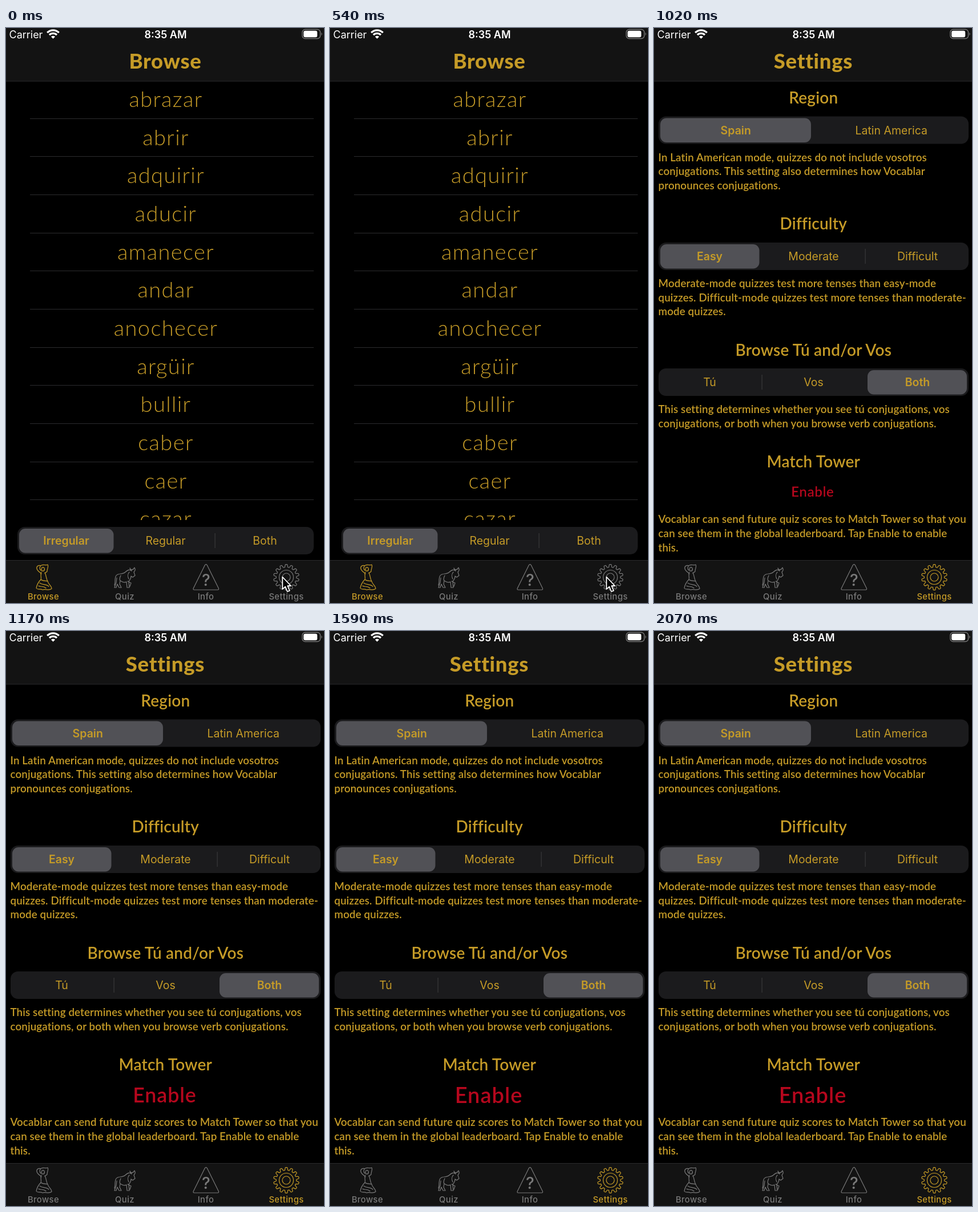
Recreate the animation shown at these times as an HTML page. Size 557 by 1005 pixels, loop 2100 ms.

```html
<!DOCTYPE html>
<html lang="en">
<head>
<meta charset="utf-8">
<title>Verb settings</title>
<style>
  html, body { margin: 0; width: 100%; height: 100%; overflow: hidden; background: #000; }
  svg { display: block; width: 100%; height: 100%; }
  text { fill: #c59b27; font-family: Lato, "Open Sans", sans-serif; white-space: pre; }
  .mid { text-anchor: middle; }
  .title { font-size: 36.5px; font-weight: 800; letter-spacing: .7px; }
  .verb { font-size: 38px; font-weight: 300; letter-spacing: 1.4px; }
  .heading { font-size: 28px; font-weight: 600; letter-spacing: .2px; }
  .note { font-size: 18.8px; font-weight: 600; letter-spacing: .1px; }
  .enable { font-size: 38px; font-weight: 600; letter-spacing: 1px; fill: #b5071d; }
  .segment, .tab, .status { font-family: Inter, Roboto, sans-serif; }
  .segment { font-size: 19.5px; }
  .chosen { font-weight: 600; }
  .tab { font-size: 14.8px; font-weight: 500; letter-spacing: .4px; fill: currentColor; }
  .status { font-size: 18px; fill: #fff; }
  .icon { fill: none; stroke: currentColor; stroke-width: 1.2; stroke-linejoin: round; stroke-linecap: round; }
  #enable { transform-origin: 277.5px 811px; }
</style>
</head>
<body>
<svg viewBox="0 0 557 1005" id="stage">
  <defs>
    <clipPath id="listArea"><rect y="93" width="557" height="767"/></clipPath>
  </defs>
  <rect width="557" height="1005"/>
  <g fill="#131313">
    <rect width="557" height="93"/>
    <rect y="931" width="557" height="74"/>
  </g>
  <g fill="#2b2b2c">
    <rect y="92.5" width="557" height="1"/>
    <rect y="930" width="557" height="1"/>
  </g>

  <text class="status" x="5.5" y="17.5">Carrier</text>
  <text class="status mid chosen" x="279.5" y="17.5">8:35 AM</text>
  <g fill="none" stroke="#fff" stroke-width="3.2">
    <path d="M72.2 8.2A14.5 14.5 0 0 1 92.8 8.2M76 12.2A9 9 0 0 1 89 12.2"/>
    <path d="M79 15.2A5 5 0 0 1 86 15.2L82.5 18.8Z" fill="#fff" stroke="none"/>
  </g>
  <rect x="519" y="2.5" width="31.5" height="16" rx="5" fill="none" stroke="#777" stroke-width="1.4"/>
  <rect x="521.2" y="4.7" width="24" height="11.6" rx="3" fill="#fff"/>
  <path d="M552.4 7.6Q555 10.5 552.4 13.4Z" fill="#777"/>

  <g id="browse"></g>
  <g id="settings"></g>

  <g id="browseTab">
    <path class="icon" stroke-width="1" d="M61 948C58 945 59 940 62 939C66 937 70 940 73 938C75 941 72 945 72 950L68 953
      M61 940C57 938 53 941 54 945C55 949 59 951 62 954M63 943C67 941 69 946 66 949C63 950 61 947 63 943
      M62 951C59 956 63 960 61 964C57 968 54 974 53 979C56 983 60 979 64 982C69 980 75 984 80 980C80 975 74 972 73 967C70 963 71 957 68 952
      M61 964C65 967 70 966 73 967M59 970C65 974 71 972 75 976M57 975C61 978 65 974 70 979"/>
  </g>
  <g id="quizTab">
    <path class="icon" d="M190 974C192 968 190 961 193 957C197 952 204 956 209 951C213 947 217 946 220 949L217 944
      C218 948 223 948 225 943C227 946 226 949 224 951L226 957L222 960L219 958C219 962 217 965 215 967L216 978H212L211 968
      C207 970 203 968 200 966L199 972L202 978H198L195 972L193 978H190L193 969L194 961
      M213 967L219 970L217 976M200 966C198 963 200 959 201 957M216 951C213 954 213 959 215 963"/>
  </g>
  <g id="infoTab">
    <path class="icon" stroke-width="1.6" d="M348.4 938.8Q350.3 936 352.2 938.8L372.2 979Q373.5 982 370.5 982H330Q327 982 328.4 979Z"/>
    <text class="tab mid" x="350.5" y="975" style="font-size:28px;letter-spacing:0">?</text>
  </g>
  <g id="settingsTab">
    <path class="icon" id="gear"/>
    <circle class="icon" cx="491" cy="960" r="12.5"/>
    <circle class="icon" cx="491" cy="960" r="7"/>
  </g>

  <path id="cursor" d="M484.3 959.5V980.8L489.2 976.4L492.8 985L496.8 983.3L493.2 975H499Z"
    fill="#000" stroke="#fff" stroke-width="1.8" stroke-linejoin="round"/>
</svg>

<script>
const DURATION = 2100;
const SWITCH = 660, CURSOR_OUT = 900;
const PULSE = { start: 680, low: 963, end: 1247, scale: 0.6 };
const GOLD = "#c59b27", GRAY = "#797979";

const byId = id => document.getElementById(id);
const browse = byId("browse"), settings = byId("settings");

function add(parent, tag, attrs, content) {
  const node = document.createElementNS("http://www.w3.org/2000/svg", tag);
  for (const key in attrs) node.setAttribute(key, attrs[key]);
  if (content) node.textContent = content;
  parent.append(node);
  return node;
}

const write = (parent, style, x, y, content) =>
  add(parent, "text", { class: style, x, y }, content);

function segments(parent, left, right, top, labels, chosen) {
  const width = (right - left) / labels.length;
  add(parent, "rect", { x: left, y: top, width: right - left, height: 48, rx: 13, fill: "#1b1b1d" });
  labels.forEach((label, i) => {
    const x = left + i * width;
    // The pill hugs the outer edge and stops short of inner edges.
    const pillLeft = x + (i ? 4 : 3);
    const pillRight = x + width - (i < labels.length - 1 ? 4.5 : 3);
    if (i === chosen) {
      add(parent, "rect", { x: pillLeft, y: top + 3, width: pillRight - pillLeft, height: 42.5, rx: 11, fill: "#515156" });
    } else if (i && i !== chosen + 1) {
      add(parent, "rect", { x: x - 0.5, y: top + 11, width: 1.2, height: 26, fill: "#39393b" });
    }
    const shift = (labels.length - 1) / 2 - i;
    write(parent, "segment mid" + (i === chosen ? " chosen" : ""), x + width / 2 - shift, top + 31.3, label);
  });
}

function section(top, heading, lines, noteY) {
  write(settings, "heading mid", 279.3, top, heading);
  lines.forEach((line, i) => write(settings, "note", 7.5, noteY + i * 24.6, line));
}

// Browse page
write(browse, "title mid", 279, 71, "Browse");
const list = add(browse, "g", { "clip-path": "url(#listArea)" });
["abrazar", "abrir", "adquirir", "aducir", "amanecer", "andar", "anochecer",
 "argüir", "bullir", "caber", "caer", "cazar"].forEach((verb, i) => {
  const y = i * 66.65;
  write(list, "verb mid", 280, 138 + y, verb);
  add(list, "rect", { x: 42, y: Math.round(157.8 + y), width: 497, height: 1, fill: "#2c2c2e" });
});
segments(browse, 20, 539, 872, ["Irregular", "Regular", "Both"], 0);

// Settings page
write(settings, "title mid", 279, 71, "Settings");
section(132, "Region", [
  "In Latin American mode, quizzes do not include vosotros",
  "conjugations. This setting also determines how Vocablar",
  "pronounces conjugations."], 232.5);
segments(settings, 8, 551, 154.5, ["Spain", "Latin America"], 0);
section(352, "Difficulty", [
  "Moderate-mode quizzes test more tenses than easy-mode",
  "quizzes. Difficult-mode quizzes test more tenses than moderate-",
  "mode quizzes."], 453);
segments(settings, 8, 551, 375, ["Easy", "Moderate", "Difficult"], 0);
section(572.5, "Browse Tú and/or Vos", [
  "This setting determines whether you see tú conjugations, vos",
  "conjugations, or both when you browse verb conjugations."], 673);
segments(settings, 8, 551, 595, ["Tú", "Vos", "Both"], 2);
section(768, "Match Tower", [
  "Vocablar can send future quiz scores to Match Tower so that you",
  "can see them in the global leaderboard. Tap Enable to enable",
  "this."], 865.3);
write(settings, "enable mid", 278, 824.5, "Enable").id = "enable";

// Tab bar
[["browse", "Browse", 65.5], ["quiz", "Quiz", 208], ["info", "Info", 350], ["settings", "Settings", 491]]
  .forEach(([id, label, x]) => {
    const tab = byId(id + "Tab");
    tab.style.color = GRAY;
    write(tab, "tab mid", x, 999, label);
  });

const TEETH = 14, STEPS = TEETH * 12;
byId("gear").setAttribute("d", "M" + Array.from({ length: STEPS }, (_, i) => {
  const angle = i / STEPS * 2 * Math.PI;
  const radius = 20 + 2.4 * Math.max(-1, Math.min(1, 1.8 * Math.cos(TEETH * angle)));
  return (491 + radius * Math.sin(angle)).toFixed(1) + " " + (960 - radius * Math.cos(angle)).toFixed(1);
}).join("L") + "Z");

// Motion
const loop = (node, frames) => node.animate(frames, { duration: DURATION, iterations: Infinity });

const cut = (node, property, before, after, time) => loop(node, [
  { [property]: before, offset: 0, easing: "step-end" },
  { [property]: after, offset: time / DURATION, easing: "step-end" },
  { [property]: after, offset: 1 }
]);

cut(browse, "opacity", 1, 0, SWITCH);
cut(settings, "opacity", 0, 1, SWITCH);
cut(byId("browseTab"), "color", GOLD, GRAY, SWITCH);
cut(byId("settingsTab"), "color", GRAY, GOLD, SWITCH);
cut(byId("cursor"), "opacity", 1, 0, CURSOR_OUT);
loop(byId("enable"), [
  [0, 1], [PULSE.start, 1], [PULSE.low, PULSE.scale], [PULSE.end, 1], [DURATION, 1]
].map(([time, scale]) => ({
  transform: `scale(${scale})`, offset: time / DURATION, easing: "ease-in-out"
})));
</script>
</body>
</html>
```
